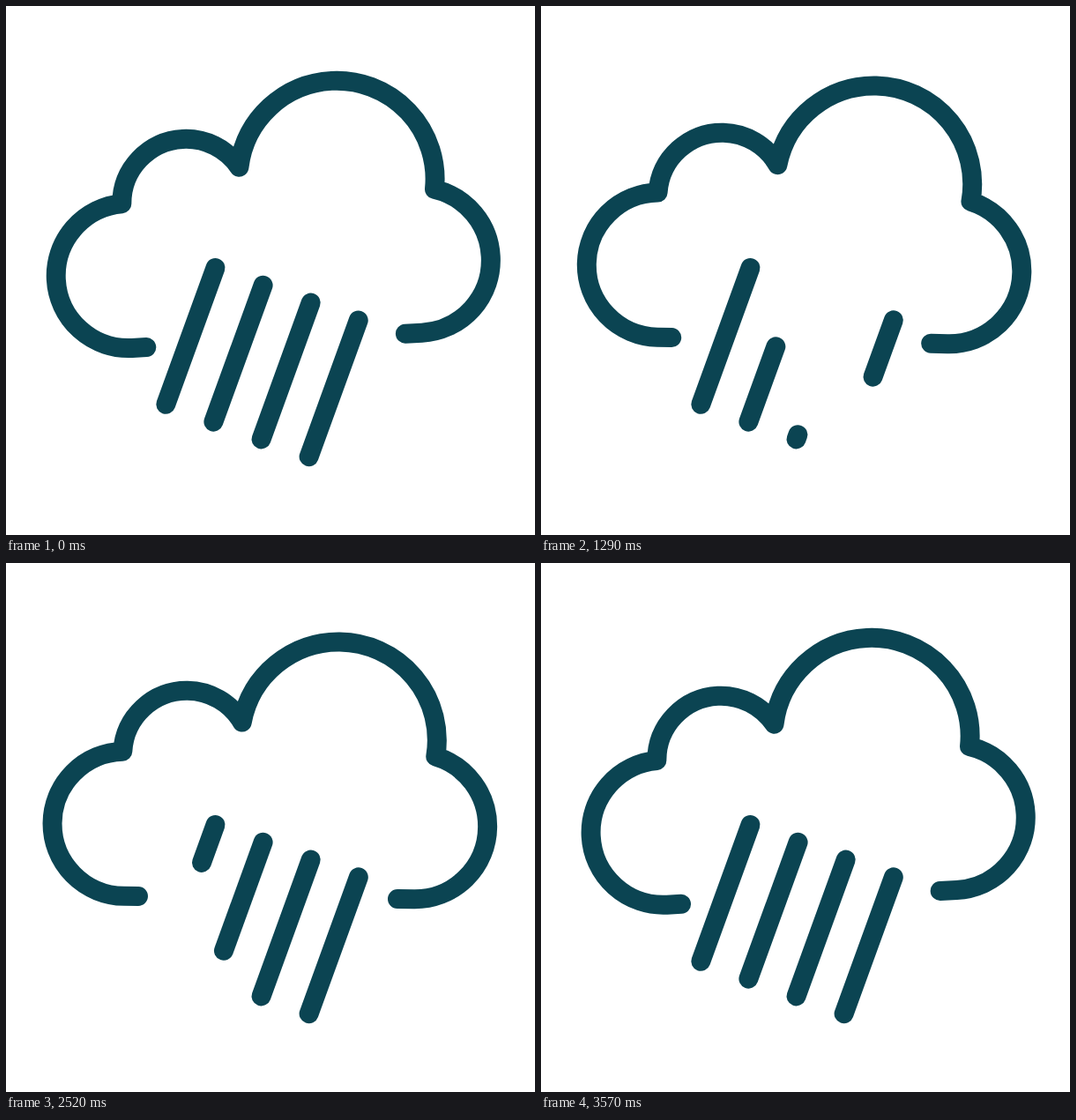
Recreate the animation shown at these times as an HTML page. Size 600 px wide and 600 px high, loop 3600 ms.

```html
<!DOCTYPE html>
<html lang="en">
<head>
<meta charset="utf-8">
<title>Rain cloud</title>
<style>
  html, body { margin: 0; width: 100%; height: 100%; overflow: hidden; background: #fff; }
  svg { display: block; width: 100%; height: 100%; }
</style>
</head>
<body>
<svg viewBox="0 0 600 600" fill="none" stroke="#0b4452" stroke-width="22" stroke-linecap="round" stroke-linejoin="round">
  <!-- each lobe is split at its outermost point -->
  <path id="cloud" d="M151.5 379.5H135.3
    A82.1 82.1 0 0 1 53.2 297.4A82.1 82.1 0 0 1 132.1 215.4
    A73 73 0 0 1 204.9 145.8A73 73 0 0 1 267.2 180.9
    A111.5 111.5 0 0 1 377.1 88.7A111.5 111.5 0 0 1 487.1 217.6
    A82.5 82.5 0 0 1 546.8 297A82.5 82.5 0 0 1 464.3 379.5H445.5"/>
  <g id="rain"></g>
</svg>
<script>
const LOOP = 3600;
const HALF = LOOP / 2;
const TILT = 3;        // degrees to either side
const WIPE = 870;      // time to clear or fill one streak
const REFILL = HALF - WIPE;
const STAGGER = 450;
const RUN = { x: -56.2, y: 154.8 };

const cloud = document.getElementById('cloud');
const rain = document.getElementById('rain');

const clamp = v => Math.min(1, Math.max(0, v));

const streaks = [0, 1, 2, 3].map(i => {
  const el = document.createElementNS('http://www.w3.org/2000/svg', 'path');
  rain.appendChild(el);
  return { el, x: 237.5 + 54.1 * i, y: 297 + 19.8 * i, delay: (3 - i) * STAGGER };
});

function drawStreak(s, time) {
  const t = (time - s.delay + LOOP) % LOOP;
  const filling = t > WIPE;
  const from = filling ? 0 : clamp(t / WIPE);
  const to = filling ? clamp((t - REFILL) / WIPE) : 1;
  const point = k => `${s.x + RUN.x * k} ${s.y + RUN.y * k}`;
  s.el.setAttribute('d', to > from ? `M${point(from)}L${point(to)}` : '');
}

function draw(time) {
  const swing = 1 - Math.abs(time / HALF - 1);
  cloud.setAttribute('transform', `rotate(${TILT * (2 * swing - 1)} 300 234.3)`);
  streaks.forEach(s => drawStreak(s, time));
}

function tick(now) {
  draw(now % LOOP);
  requestAnimationFrame(tick);
}

draw(0);
requestAnimationFrame(tick);
</script>
</body>
</html>
```
